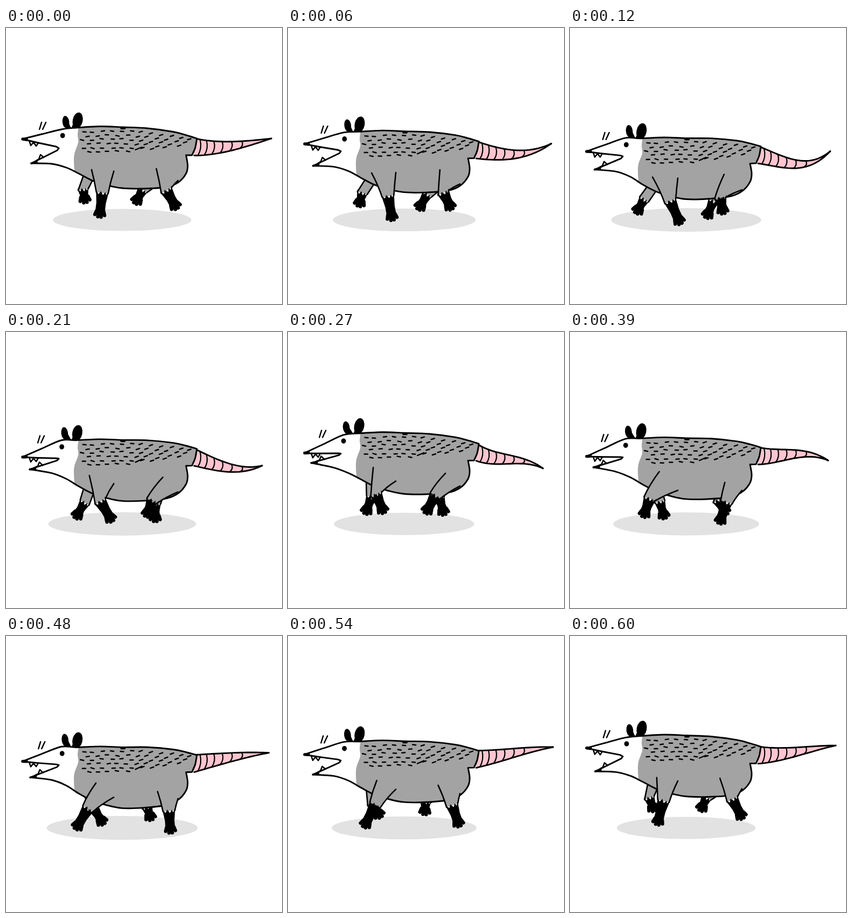
Animation, 512 px wide and 512 px high, one loop 630 ms. Source, as an HTML page with a canvas:

```html
<!DOCTYPE html>
<html>
<head>
<meta charset="utf-8">
<title>Walking opossum</title>
<style>
html, body { margin: 0; width: 100%; height: 100%; overflow: hidden; background: #fff; }
canvas { display: block; width: 512px; height: 512px; }
</style>
</head>
<body>
<canvas id="stage" width="512" height="512"></canvas>
<script>
const ctx = document.getElementById('stage').getContext('2d');
const LOOP = 630, STEP = 30;
const BOUNCE = 307.5; // two bounces settle just before the loop ends
const GREY = '#a3a3a3', PINK = '#ffc5d0', SHADOW = '#e2e2e2', INK = '#000';

// peak: when the foot is furthest back; hip: tops of the two leg lines
const nearFront = { x: 167, ground: 339, stride: 38, lift: 10, peak: 140, half: 11,
  hip: { left: [160, 255], right: [200, 272], fold: 11 } };
const nearHind = { x: 288, ground: 335, stride: 32, lift: 10, peak: 580, half: 11,
  hip: { left: [285, 262], right: [319, 283], fold: 0 } };
const farFront = { x: 152, ground: 328, stride: 29, lift: 6, peak: 455, half: 9.5 };
const farHind = { x: 267, ground: 328, stride: 27, lift: 8, peak: 330, half: 9.5 };

const clamp = v => Math.max(0, Math.min(1, v));
const wave = (t, peak, period = LOOP) => Math.cos(2 * Math.PI * (t - peak) / period);
const random = seed => {
  const v = Math.sin(seed * 12.9898) * 43758.5453;
  return v - Math.floor(v);
};

// Adds a rounded curve through the points to the current path
function curve(pts, start) {
  if (start) ctx.moveTo(...pts[0]); else ctx.lineTo(...pts[0]);
  for (let i = 0; i < pts.length - 1; i++) {
    const a = pts[Math.max(0, i - 1)], b = pts[i], c = pts[i + 1];
    const d = pts[Math.min(pts.length - 1, i + 2)];
    ctx.bezierCurveTo(b[0] + (c[0] - a[0]) / 6, b[1] + (c[1] - a[1]) / 6,
      c[0] - (d[0] - b[0]) / 6, c[1] - (d[1] - b[1]) / 6, c[0], c[1]);
  }
}

function line(pts, width = 2.6) {
  ctx.lineWidth = width;
  ctx.beginPath();
  pts.forEach(p => ctx.lineTo(...p));
  ctx.stroke();
}

function shape(pts, color) {
  ctx.fillStyle = color;
  ctx.beginPath();
  pts.forEach(p => ctx.lineTo(...p));
  ctx.closePath();
  ctx.fill();
}

function oval(x, y, rx, ry, color, turn = 0) {
  ctx.fillStyle = color;
  ctx.beginPath();
  ctx.ellipse(x, y, rx, ry, turn, 0, 7);
  ctx.fill();
}

// Pose of a leg; the ankle swings half as far as the foot, a little ahead of it
function legPose(leg, t, bob) {
  const swing = wave(t, leg.peak), lead = wave(t, leg.peak - 45);
  const raise = leg.lift * wave(t, leg.peak + 195), drop = .8 * bob;
  const ax = leg.x + .52 * leg.stride * lead, ay = 302 - .4 * raise + drop;
  const fx = leg.x + leg.stride * swing, fy = leg.ground - raise + drop;
  const len = Math.hypot(fx - ax, fy - ay);
  const ux = (fx - ax) / len, uy = (fy - ay) / len;
  // Maps (across, along) to the stage, along running from ankle to foot
  const at = (v, u) => [ax + v * uy + u * ux, ay - v * ux + u * uy];
  return { at, len, swing, lead, raise, drop, left: at(-leg.half, 0), right: at(leg.half, 0) };
}

function paw({ at, len }, half) {
  const sole = len - 7;
  shape([at(-half - 1, -4), at(-half * .6, 3), at(-half * .25, -3), at(half * .15, 4),
    at(half * .5, -2), at(half * .7, 3), at(half + 1, -4),
    at(half * .8, len * .45), at(9, sole), at(-9, sole), at(-half * .8, len * .45)], INK);
  for (const v of [-9, -3, 3, 9])
    line([at(v * .75, sole - 2), at(v, len + 2 - v * v / 20)], 6.5);
}

function farLeg(leg, hipX, hipY, t, bob) {
  const p = legPose(leg, t, bob);
  const left = [hipX - 11, hipY], right = [hipX + 11, hipY];
  shape([left, p.left, p.right, right], GREY);
  line([left, p.left]);
  line([right, p.right]);
  paw(p, leg.half);
}

function nearLeg(leg, t, bob) {
  const p = legPose(leg, t, bob), { left, right, fold } = leg.hip;
  const a = [left[0] - 7 * p.swing, left[1] - .8 * p.raise + p.drop];
  const b = [right[0], right[1] - fold * p.lead + p.drop];
  const bend = (top, end) => [top[0] * .38 + end[0] * .62, (top[1] + end[1]) / 2];
  const sideA = () => ctx.quadraticCurveTo(...bend(a, p.left), ...p.left);
  const sideB = () => ctx.quadraticCurveTo(...bend(b, p.right), ...b);
  ctx.fillStyle = GREY;
  ctx.lineWidth = 2.6;
  ctx.beginPath();
  ctx.moveTo(...a); sideA(); ctx.lineTo(...p.right); sideB();
  ctx.fill();
  ctx.beginPath();
  ctx.moveTo(...a); sideA();
  ctx.moveTo(...p.right); sideB();
  ctx.stroke();
  paw(p, leg.half);
}

// The swing travels down the tail, so each part follows the one before
function tail(t, rootY) {
  const rootX = 349, whip = wave(t, 275);
  const tipX = 483 - 10 * whip, tipY = 228 + 25 * whip;
  const knots = [[rootX, rootY], [400, rootY + 4 + 13 * wave(t, 185)],
    [440, rootY + 3 + 19 * wave(t, 200)], [tipX, tipY]];
  const mid = x => knots.reduce((sum, [xi, yi]) => sum + knots.reduce(
    (p, [xj]) => xj === xi ? p : p * (x - xj) / (xi - xj), yi), 0);
  const half = x => 16 * (tipX - x) / (tipX - rootX);
  const top = [], bottom = [];
  for (let i = 0; i <= 24; i++) {
    const x = rootX + (tipX - rootX) * i / 24;
    top.push([x, mid(x) - half(x)]);
    bottom.push([x, mid(x) + half(x)]);
  }
  shape([...top, ...bottom.slice().reverse()], PINK);
  line(top, 2.9);
  line(bottom, 2.9);
  ctx.lineWidth = 2.2;
  ctx.beginPath();
  for (let i = 0; i < 6; i++) {
    const x = 360 + 11 * i + .9 * i * i;
    ctx.moveTo(x, mid(x) - half(x));
    ctx.quadraticCurveTo(x + 4, mid(x) + 2, x - 4, mid(x - 4) + half(x - 4));
  }
  ctx.stroke();
}

// Staggered rows of short hairs, each row ending further left
function hairs(body) {
  for (let row = 0; row < 6; row++) {
    const end = 345 - 4.5 * row * row;
    for (let x = 143 + row % 2 * 9, i = 0; x < end; x += 18, i++) {
      const seed = row * 31 + i + 1;
      const hx = x + 5 * random(seed) - 2;
      const hy = 191 + 7.6 * row + .0008 * (hx - 200) ** 2 + 3 * random(seed + 300) - 1.5;
      const rise = hx > 235 ? .9 : 1.4 * random(seed + 600) - .9;
      line([[hx - 3, hy + rise], [hx + 3, hy - rise]].map(body), 2.5);
    }
  }
  line([[240, 226], [252, 221]].map(body), 2.4);
}

function draw(t) {
  const bob = 12.2 * (1 - wave(t, 0, BOUNCE));
  const shut = (1 - wave(t, 0)) / 2;
  // The bob is strongest at the shoulders
  const sway = x => bob * (.95 - .27 * clamp((x - 220) / 130) - .25 * clamp((135 - x) / 35));
  const body = ([x, y]) => [x, y + sway(x)];
  const snout = ([x, y]) => body([x, y + 17 * shut ** .65 * clamp((105 - x) / 75)]);
  const jaw = ([x, y]) => {
    const reach = shut * clamp((100 - x) / 53);
    return body([x - 4 * reach, y - 11 * reach]);
  };

  ctx.fillStyle = '#fff';
  ctx.fillRect(0, 0, 512, 512);
  ctx.strokeStyle = INK;
  ctx.lineCap = ctx.lineJoin = 'round';

  oval(215.5, 356, 128.5 + bob / 2, 20.5 + bob * .07, SHADOW);
  farLeg(farFront, 156, 270 + bob, t, bob);
  farLeg(farHind, 282, 283 + bob, t, bob);
  tail(t, 220.5 + sway(349));

  oval(111 - 3 * shut, 174.5 + sway(112), 6.3, 11.5, INK, -.12);
  oval(133 - shut, 171.5 + sway(132), 9.3, 15, INK, .2);
  line([body([113 - 2 * shut, 178]), body([117, 187])], 8);
  line([body([129, 178]), body([126, 186])], 9);

  const back = [[30, 206], [66, 197], [103, 188]].map(snout).concat(
    [[130, 185], [175, 182.5], [217, 184], [262, 186], [310, 192.5], [335, 199], [354, 205]].map(body));
  const rump = [[354, 205], [351, 222], [345, 236]].map(body);
  const belly = [[334, 236], [337, 255], [334, 270], [320, 286], [298, 295], [255, 298], [215, 297],
    [185, 291], [160, 283], [135, 270]].map(body).concat([[112, 259], [85, 252], [47, 251]].map(jaw));
  const mouth = [jaw([61, 244]), jaw([95, 227]), body([98, 223]), snout([93, 220]), snout([60, 213])];
  const outline = () => {
    ctx.beginPath();
    curve(back, true);
    curve(rump);
    curve(belly);
    mouth.forEach(p => ctx.lineTo(...p));
    ctx.closePath();
  };

  outline();
  ctx.fillStyle = '#fff';
  ctx.fill();
  ctx.save();
  ctx.clip();
  ctx.fillStyle = GREY;
  ctx.beginPath();
  curve([[136, 175], [133, 197], [134, 212], [127, 233], [126, 250], [128, 275]].map(body), true);
  ctx.lineTo(128, 330);
  ctx.lineTo(370, 330);
  ctx.lineTo(370, 170);
  ctx.fill();
  ctx.restore();
  outline();
  ctx.lineWidth = 2.9;
  ctx.stroke();

  hairs(body);
  line([[214, 186], [220, 186]].map(body), 4);

  // Face
  oval(105 - 2 * shut, 199.5 + sway(112), 4.4, 4.8, INK);
  line([[31, 206], [38, 207]].map(snout), 5.5);
  line([[43, 209], [46, 218], [51, 212], [56, 219], [60, 213]].map(snout), 2.5);
  line([[56, 246], [61, 243], [64, 235], [70, 240]].map(jaw), 2.5);
  line([[47, 251], [57, 248]].map(jaw), 3.8);

  // Motion marks above the head
  const dx = -4 * shut, dy = bob * .8 + 5 * shut;
  line([[66 + dx, 175 + dy], [62 + dx, 188 + dy]], 2.4);
  line([[74 + dx, 175 + dy], [68 + dx, 188 + dy]], 2.4);

  nearLeg(nearHind, t, bob);
  nearLeg(nearFront, t, bob);
}

const begin = performance.now();
function tick() {
  const elapsed = Math.max(0, performance.now() - begin) % LOOP;
  draw(Math.floor(elapsed / STEP) * STEP);
  requestAnimationFrame(tick);
}
tick();
</script>
</body>
</html>
```
